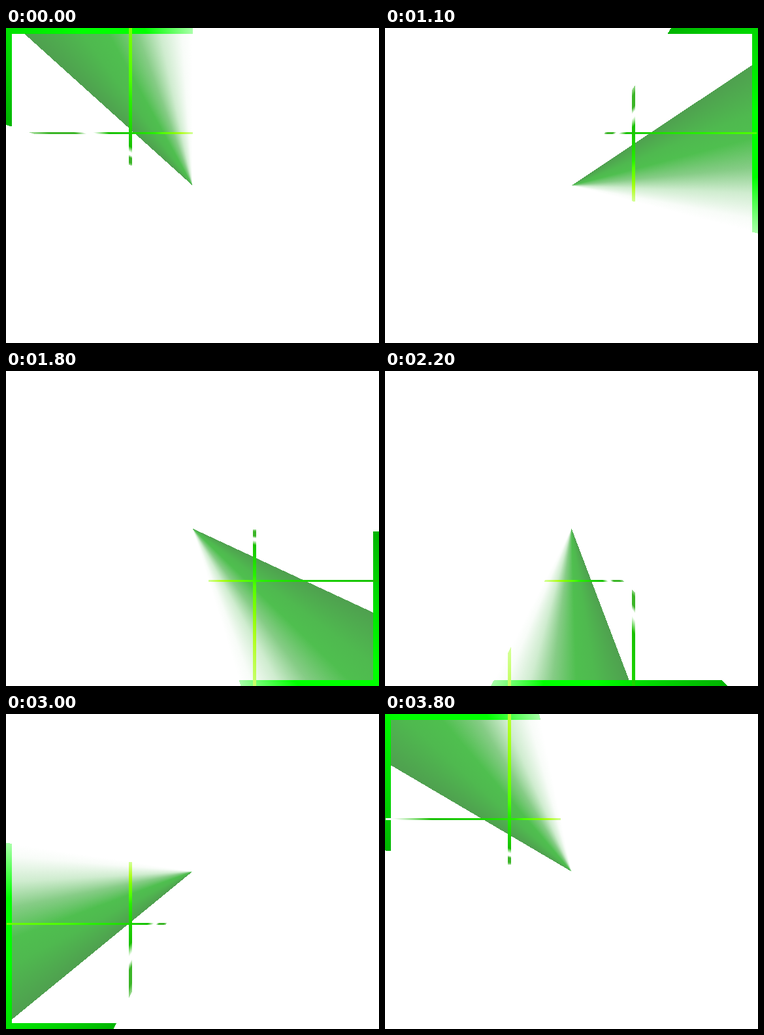
An HTML page that plays this animation: 571 px wide and 481 px high, repeating every 3900 ms.

```html
<!DOCTYPE html>
<html lang="en">
<head>
<meta charset="utf-8">
<title>Radar sweep</title>
<style>
  html, body { margin: 0; width: 100%; height: 100%; overflow: hidden; background: #fff; }
  #stage { --lead: 0deg; position: relative; width: 571px; height: 481px; overflow: hidden; }
  #stage div { position: absolute; inset: 0; }

  /* All gradients run from the tail (0deg) to the leading edge (72deg). */
  .beam {
    clip-path: inset(9px);
    background: conic-gradient(from calc(var(--lead) - 72deg) at 285.5px 240.5px,
      transparent 24deg, #4fa04f 24deg, #4fb94f 36deg, #4fbf4f 43deg, #86cc86 52deg,
      #cfeccf 60deg, #f8fcf8 68deg, #fff 72deg, transparent 72deg);
  }
  .frame {
    clip-path: path(evenodd, "M0 0H571V481H0ZM9 9H562V472H9Z");
    background: conic-gradient(from calc(var(--lead) - 72deg) at 285.5px 240.5px,
      #00b400 0deg, #0f0 36deg, #0f0 55deg, #afa 72deg, transparent 72deg);
  }
  .grid {
    clip-path: path("M188 0h5v481h-5ZM378 0h5v481h-5ZM1 159h568v3h-568ZM1 319h568v3h-568Z");
    background: conic-gradient(from calc(var(--lead) - 72deg) at 285.5px 240.5px,
      #18a80066 0deg, #18a800d9 2deg, #18a800d9 6deg, #fff 8deg, #fff 10deg,
      #18c000 14deg, #1cd800 24deg, #28f000 36deg, #50ff00 42deg, #80ff00 52deg,
      #b0ff20 60deg, #d4ff98 72deg, transparent 72deg);
  }
</style>
</head>
<body>
<div id="stage">
  <div class="beam"></div>
  <div class="frame"></div>
  <div class="grid"></div>
</div>
<script>
  const STEPS = 39, STEP_MS = 100;
  const stage = document.getElementById('stage');

  // The leading edge follows a point moving evenly around a square.
  function leadAngle(step) {
    const u = 8 * step / STEPS;
    const axis = 2 * Math.round(u / 2);
    return axis * 45 + Math.atan(u - axis) * 180 / Math.PI;
  }

  function draw() {
    const step = Math.floor(performance.now() / STEP_MS) % STEPS;
    stage.style.setProperty('--lead', leadAngle(step) + 'deg');
    requestAnimationFrame(draw);
  }
  draw();
</script>
</body>
</html>
```
